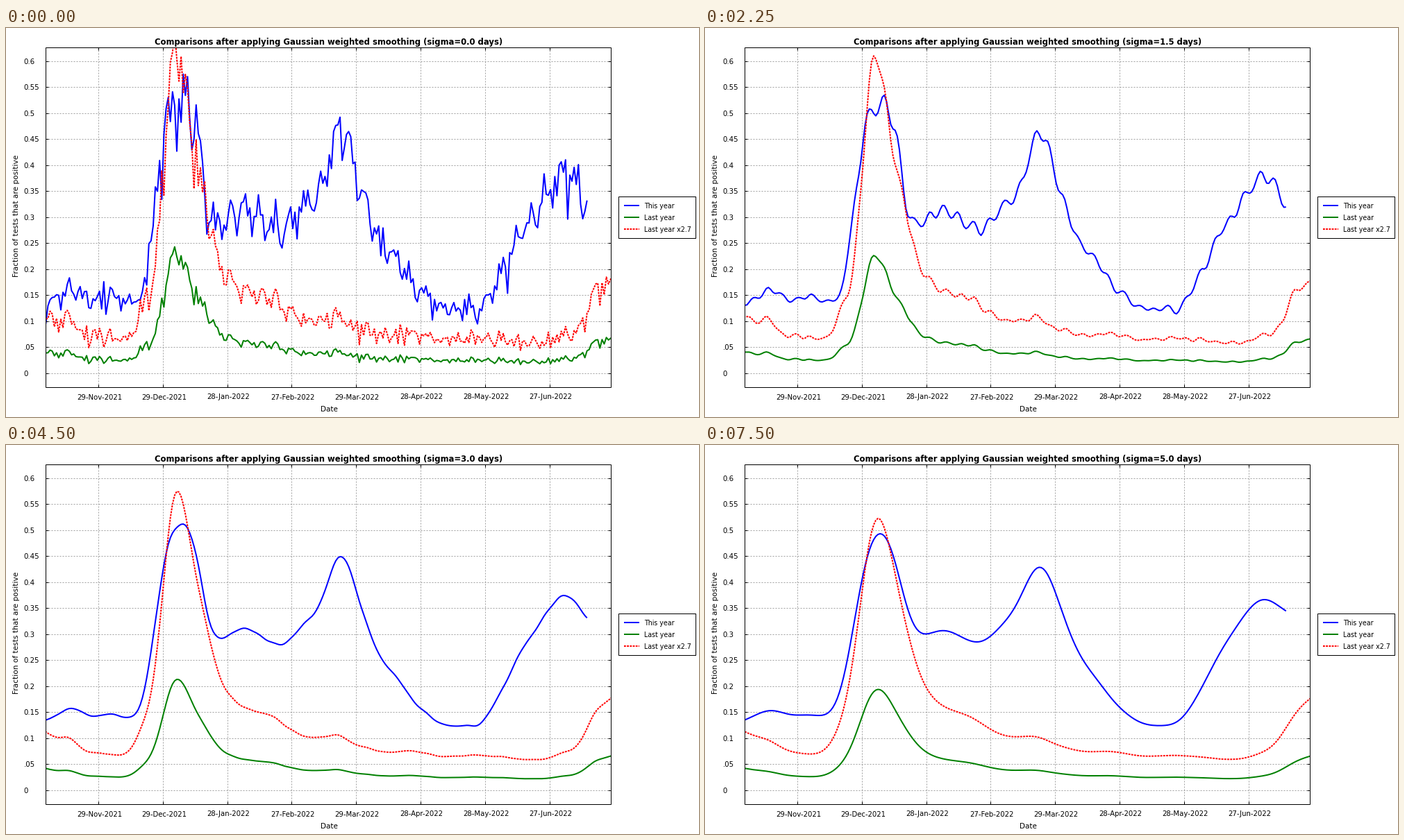
A matplotlib script that plays this animation: 998 by 561 pixels, repeating every 8000 ms.

```python
import numpy as np
import matplotlib.pyplot as plt
from matplotlib.animation import FuncAnimation
from matplotlib.patches import Rectangle

W, H, DPI = 998, 561, 64
LEFT, RIGHT, TOP, BOTTOM = 57.5, 871.5, 27.5, 517.5
SCALE = 2.7
STEP_MS, STEPS, HOLD = 250, 32, 3
FIRST_DAY, SPACING = -10, 5

plt.rcParams["font.family"] = "DejaVu Sans"

# Trend in positive tests per thousand, one knot every SPACING days
THIS_YEAR = [116, 126, 137, 144, 159, 153, 140, 145, 147, 138, 143, 176, 320,
             469, 505, 512, 440, 312, 291, 297, 314, 305, 295, 283, 276, 299,
             327, 340, 394, 457, 436, 360, 300, 251, 228, 204, 169, 154, 134,
             124, 122, 127, 119, 147, 182, 220, 270, 292, 329, 355, 378, 366,
             333, 306]
LAST_YEAR = [132, 121, 109, 98, 106, 80, 71, 72, 68, 66, 85, 138, 218, 460,
             608, 505, 385, 300, 210, 181, 160, 154, 147, 143, 123, 113, 101,
             101, 103, 109, 92, 85, 80, 73, 73, 75, 75, 71, 66, 64, 66, 66,
             67, 66, 64, 62, 59, 58, 58, 64, 74, 77, 107, 157, 166, 188, 205]

# Reporting rhythm, counted from the weekly low
WEEK = np.array([-0.13, -0.03, 0.01, 0.06, 0.06, 0.03, 0.0])


def smooth(days, vals, sigma):
    if sigma == 0:
        return vals
    gap = days[:, None] - days[None, :]
    weight = np.exp(-0.5 * (gap / sigma) ** 2)
    return weight @ vals / weight.sum(axis=1)


def spline(knots):
    """Catmull-Rom curve through the knots, one value per day."""
    ends = [2 * knots[0] - knots[1], *knots, 2 * knots[-1] - knots[-2]]
    pts = np.array(ends) / 1000
    slope = (pts[2:] - pts[:-2]) / 2
    pts = pts[1:-1]
    pos = np.arange((len(knots) - 1) * SPACING + 1) / SPACING
    i = np.minimum(pos.astype(int), len(knots) - 2)
    t = pos - i
    return ((2 * t**3 - 3 * t**2 + 1) * pts[i] + (t**3 - 2 * t**2 + t) * slope[i]
            + (3 * t**2 - 2 * t**3) * pts[i + 1] + (t**3 - t**2) * slope[i + 1])


def daily(knots, low_day, seed):
    """Raw daily series: sharpened trend, weekly rhythm and jitter."""
    trend = spline(knots)
    days = np.arange(len(trend)) + FIRST_DAY
    sharp = 2 * trend - smooth(days, trend, 2)
    noise = np.random.default_rng(seed).normal(size=len(days) + 1)
    jitter = 0.02 * np.sqrt(trend) * np.diff(noise)
    return days, sharp + trend * WEEK[(days - low_day(days)) % 7] + jitter


def px(size):
    return size * 72 / DPI


def x_of(day):
    return 60.4 + 3.093 * day


def y_of(val):
    return 497.5 - 750 * val


now_days, now_vals = daily(THIS_YEAR, lambda d: np.where(d < 48, 6, 4), 3)
old_days, old_vals = daily(LAST_YEAR, lambda d: 5, 8)
shown = now_days <= 251
now_days, now_vals = now_days[shown], now_vals[shown]

fig = plt.figure(figsize=(W / DPI, H / DPI), dpi=DPI, facecolor="white")
ax = fig.add_axes([0, 0, 1, 1])
ax.set_xlim(0, W)
ax.set_ylim(H, 0)
ax.axis("off")


def line(xs, ys, color, width=1, **kw):
    return ax.plot(xs, ys, color=color, lw=px(width), solid_capstyle="butt",
                   dash_capstyle="butt", **kw)[0]


def label(x, y, text, size, **kw):
    kw.setdefault("va", "baseline")
    return ax.text(x, y, text, fontsize=px(size), color="black", **kw)


def box(x0, y0, x1, y1):
    ax.add_patch(Rectangle((x0, y0), x1 - x0, y1 - y0, fill=False,
                           ec="black", lw=px(1), zorder=4))


def grid(xs, ys):
    line(xs, ys, "#a0a0a0", ls=(0, (2, 2)), zorder=1)


def tick(xs, ys):
    line(xs, ys, "black", zorder=3)


for k in range(13):
    y = y_of(k * 0.05)
    grid([LEFT, RIGHT], [y, y])
    tick([LEFT, LEFT + 4], [y, y])
    tick([RIGHT - 4, RIGHT], [y, y])
    text = ".05" if k == 1 else f"{k * 0.05:.2f}".rstrip("0").rstrip(".")
    label(25.5, y + 4, text, 10.2)

dates = ["29-Nov-2021", "29-Dec-2021", "28-Jan-2022", "27-Feb-2022",
         "29-Mar-2022", "28-Apr-2022", "28-May-2022", "27-Jun-2022"]
for k, date in enumerate(dates):
    x = int(133.5 + 92.8 * k) + 0.5
    grid([x, x], [TOP, BOTTOM])
    tick([x, x], [TOP, TOP + 4])
    tick([x, x], [BOTTOM - 4, BOTTOM])
    drop = 1 if set(date) & set("Jpy") else 0
    label(x + 1, 536 - drop, date, 10.1, ha="center")

box(LEFT, TOP, RIGHT, BOTTOM)
label(465, 553, "Date", 10.4, ha="center")
label(14.8, 271, "Fraction of tests that are positive", 10.45,
      rotation=90, ha="center", va="center")
title = label(465, 24, "", 11.64, ha="center", weight="bold")

styles = [("This year", "#0000ff", "-"), ("Last year", "#008000", "-"),
          ("Last year x2.7", "#ff0000", (0, (1.4, 0.7)))]
area = Rectangle((LEFT, TOP), RIGHT - LEFT, BOTTOM - TOP,
                 transform=ax.transData)
box(882.5, 242.5, 993.5, 302.5)
curves = []
for k, (name, color, dash) in enumerate(styles):
    y = 256 + 17 * k
    line([890, 912], [y, y], color, 2, ls=dash)
    label(919, y + 4, name, 9.5)
    curve = line([], [], color, 2, ls=dash, zorder=2 + k / 10)
    curve.set_clip_path(area)
    curves.append(curve)


def draw(step):
    sigma = 0.5 * (step // HOLD)
    title.set_text("Comparisons after applying Gaussian weighted smoothing "
                   f"(sigma={sigma:.1f} days)")
    now = smooth(now_days, now_vals, sigma)
    old = smooth(old_days, old_vals, sigma)
    curves[0].set_data(x_of(now_days), y_of(now))
    curves[1].set_data(x_of(old_days), y_of(old / SCALE))
    curves[2].set_data(x_of(old_days), y_of(old))
    return [title, *curves]


anim = FuncAnimation(fig, draw, frames=STEPS, interval=STEP_MS, repeat=True,
                     repeat_delay=0, blit=False)
plt.show()
```
